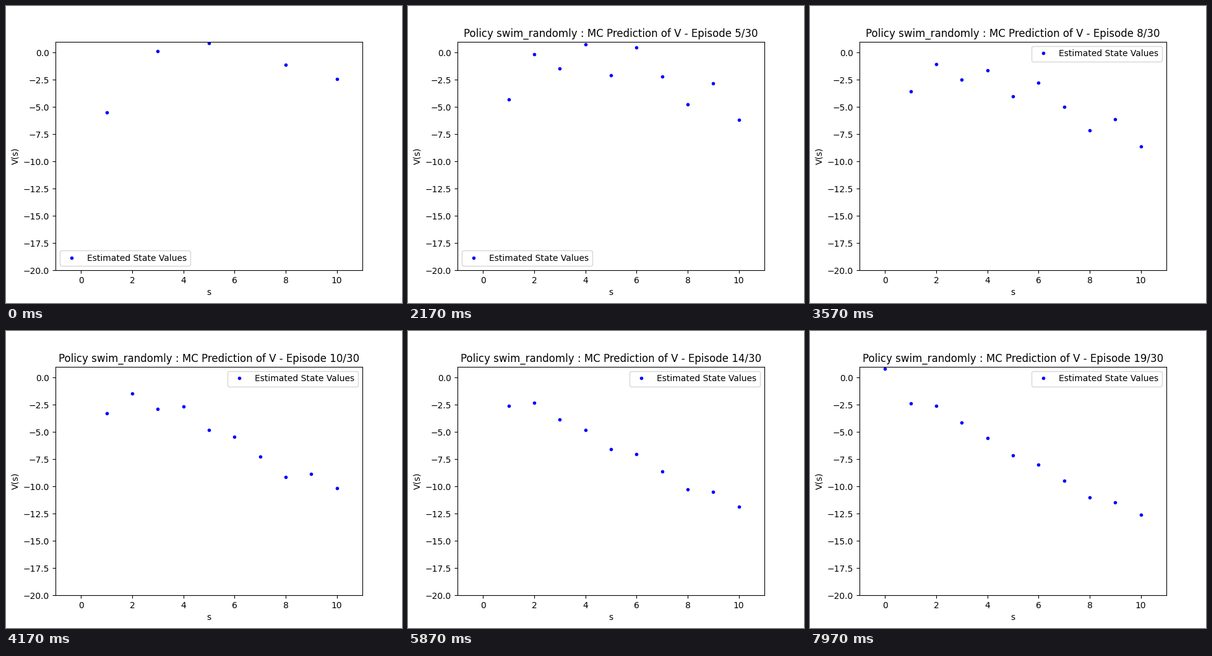
Write a matplotlib script that moves like this. It is 640 px wide and 480 px high and loops after 8000 ms.

```python
import matplotlib.pyplot as plt
import numpy as np
from matplotlib.animation import FuncAnimation

LOOP, STEP = 8000, 32
EPISODE, EPISODES = 400, 30
LEGEND_MOVE = 2900

STATES = np.arange(11)
PHASE = 0.85 * (10 - STATES) / 10      # when an episode reaches each state

# Estimates of states 1 to 10: initial guess and where it settles.
FIRST = np.array([-5.48, 1.3, 0.13, 4.4, 0.88, 5.4, 2.05, -1.1, 2.2, -2.41])
LAST = np.array([-2.36, -2.58, -4.13, -5.53, -7.13,
                 -7.98, -9.45, -10.99, -11.44, -12.58])

# Learning progress shared by all states: time in ms and share of the way.
TIMES = np.array([0, 1170, 2170, 3570, 4830, 5870, 6500, 7970]) // STEP * STEP
SHARE = [0, 0.19, 0.37, 0.61, 0.91, 0.93, 1.04, 1]


def visits(t, phase):
    return np.floor(t / EPISODE - phase)


def progress(t, phase):
    """A state learns only when visited, so its progress moves in steps."""
    return np.interp(visits(t, phase), visits(TIMES, phase), SHARE)


def estimates(t):
    done = np.array([progress(t, p) for p in PHASE[1:]])
    end_state = 4 * 0.92 ** visits(t, PHASE[0])
    return np.append(end_state, FIRST + (LAST - FIRST) * done)


def heading(t):
    if t == 0:
        return ""
    n = max(1, t // EPISODE)
    return (f"Policy swim_randomly : MC Prediction of V - "
            f"Episode {n}/{EPISODES}")


fig, ax = plt.subplots(figsize=(6.4, 4.8), dpi=100)
dots, = ax.plot(STATES, estimates(0), "b.", label="Estimated State Values")
ax.set_xlim(-1, 11)
ax.set_ylim(-20, 1)
ax.set_xlabel("s")
ax.set_ylabel("V(s)")
title = ax.set_title("")
legend = ax.legend(loc="lower left")


def update(i):
    t = i * STEP
    dots.set_ydata(estimates(t))
    title.set_text(heading(t))
    legend.set_loc("lower left" if t < LEGEND_MOVE else "upper right")
    return dots, title, legend


anim = FuncAnimation(fig, update, frames=LOOP // STEP, interval=STEP,
                     init_func=lambda: update(0), repeat=True, repeat_delay=0)
plt.show()
```
